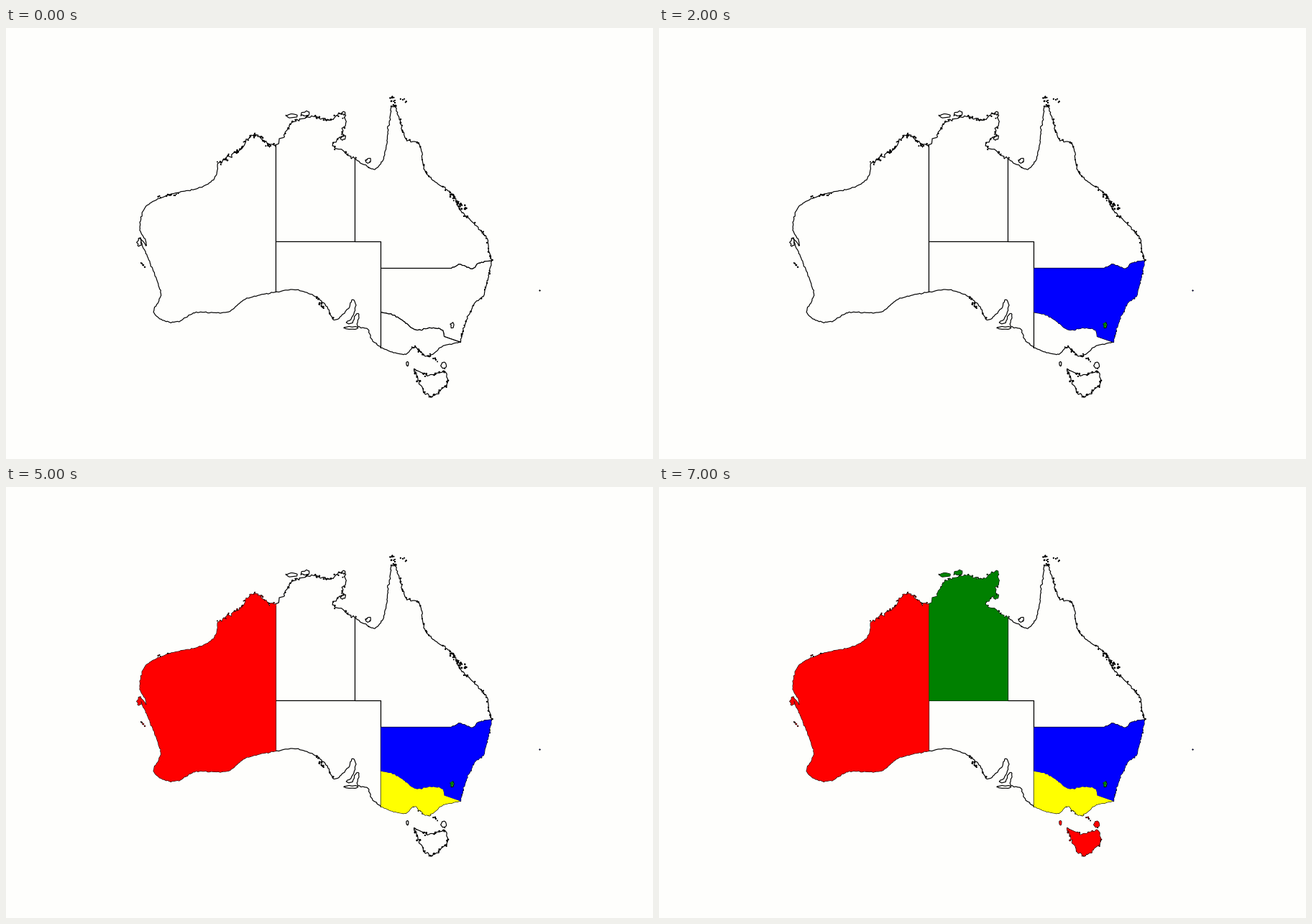
A matplotlib script that plays this animation: 900 by 600 pixels, repeating every 8000 ms.

```python
import numpy as np
import matplotlib.pyplot as plt
from matplotlib.animation import FuncAnimation
from matplotlib.collections import PolyCollection

W, H, DPI = 900, 600, 100
PAPER, INK = "#fefefc", "#000000"
BLUE, GREEN, RED, YELLOW = "#0000ff", "#008000", "#ff0000", "#ffff00"
rng = np.random.default_rng(7)


def coast(keys, amp=0.6, gap=2.2):
    """Smooth curve through key points with a ragged edge; ends stay put."""
    p = np.array(keys, float)
    tangent = np.gradient(p, axis=0)
    tangent /= np.hypot(*tangent.T)[:, None]
    parts = []
    for a, b, u, v in zip(p, p[1:], tangent, tangent[1:]):
        size = np.hypot(*(b - a))
        t = np.linspace(0, 1, max(2, int(size / gap)), endpoint=False)[:, None]
        s = t * t * (3 - 2 * t)
        bend = t * (1 - t) ** 2 * u - t * t * (1 - t) * v
        parts.append(a + (b - a) * s + 0.8 * size * bend)
    line = np.vstack(parts + [p[-1:]])
    line[1:-1] += np.clip(rng.normal(0, amp, (len(line) - 2, 2)), -2 * amp, 2 * amp)
    return line


def blob(x, y, rx, ry, amp=0.4):
    """Small island: a ragged ellipse."""
    a = np.linspace(0, 2 * np.pi, 14, endpoint=False)
    return np.c_[x + rx * np.cos(a), y + ry * np.sin(a)] + rng.normal(0, amp, (14, 2))


def specks(line, n, spread):
    """Tiny islands scattered along a line."""
    line = np.asarray(line, float)
    i = rng.integers(0, len(line) - 1, n)
    t = rng.random((n, 1))
    spots = line[i] * (1 - t) + line[i + 1] * t + rng.normal(0, spread, (n, 2))
    return [blob(x, y, r, r, 0.1) for (x, y), r in zip(spots, rng.uniform(0.2, 0.8, n))]


# Coasts and winding borders
kimberley = coast([(375, 162), (366, 163), (350, 149), (336, 153), (327, 166),
                   (318, 174), (306, 181), (294, 188)], 1.9)
west = coast([(294, 188), (291, 207), (272, 221), (226, 232), (193, 249),
              (186, 279), (195, 302), (186, 292), (203, 334), (215, 371),
              (205, 395), (222, 408), (240, 408), (262, 396), (308, 395),
              (333, 377), (375, 367)], 0.45)
south = coast([(375, 367), (402, 364), (431, 374), (446, 388), (457, 406),
               (476, 389), (482, 377), (486, 386), (479, 406), (473, 409),
               (481, 410), (489, 397), (489, 414), (503, 419), (508, 432),
               (521, 445)], 0.5)
strait = coast([(521, 445), (554, 454), (567, 444), (574, 449), (587, 457),
                (606, 443), (632, 437)], 0.5)
east = coast([(632, 437), (637, 414), (651, 383), (662, 374), (669, 352),
              (675, 324)])
north_east = coast([(485, 182), (511, 196), (522, 187), (529, 160), (533, 127),
                    (538, 108), (545, 122), (556, 154), (574, 161), (584, 202),
                    (621, 232), (632, 254), (643, 264), (669, 293), (671, 308),
                    (675, 324)], 0.7)
top_end = coast([(375, 162), (385, 150), (398, 131), (421, 123), (450, 128),
                 (469, 118), (470, 134), (466, 150), (455, 162), (468, 171),
                 (485, 182)], 1.1)
tasmania = coast([(567, 474), (588, 483), (611, 478), (611, 496), (594, 511),
                  (581, 507), (575, 493), (567, 474)], 0.9)
tweed = coast([(619, 334), (632, 329), (649, 335), (657, 327), (675, 324)])
murray = coast([(521, 395), (541, 400), (557, 412), (570, 420), (588, 418),
                (606, 419), (609, 429)])

regions = {
    "wa": [np.vstack([kimberley, west]), blob(185, 298, 2, 5, 0.8),
           *specks(kimberley, 40, 1.6), *specks([(211, 234), (245, 229)], 12, 1),
           *specks([(188, 327), (193, 332)], 4, 0.6)],
    "nt": [np.vstack([top_end, [(485, 297), (375, 297)]]),
           blob(397, 122, 8, 3, 0.9), blob(416, 119, 6, 3, 0.9),
           blob(469, 152, 3, 3, 0.9), *specks(top_end[10:], 34, 1.3)],
    "sa": [np.vstack([south, [(521, 297), (375, 297)]]),
           blob(479, 417, 10, 2), *specks([(430, 375), (457, 406)], 16, 1.2)],
    "qld": [np.vstack([north_east, tweed[::-1], [(521, 334), (521, 297), (485, 297)]]),
            blob(503, 184, 3.5, 3, 0.7), *specks([(537, 94), (540, 112)], 18, 2),
            *specks([(545, 97), (558, 101)], 5, 1), *specks(north_east[60:], 45, 0.9),
            *specks([(618, 231), (640, 253)], 28, 2.4)],
    "nsw": [np.vstack([[(521, 334)], tweed, east[::-1], murray[::-1]]),
            *specks([(742, 365), (742, 365)], 1, 0), *specks(east, 14, 0.6)],
    "vic": [np.vstack([murray, strait[::-1]]), *specks(strait[20:35], 14, 1)],
    "act": [blob(620, 413, 2, 4)],
    "tas": [tasmania, blob(558, 467, 1.6, 3, 0.2), blob(608, 469, 3, 4.5, 0.8),
            *specks(tasmania, 36, 1.1), *specks([(592, 459), (601, 463)], 4, 0.8)],
}

# One assignment per second; the first second is blank
steps = [("nsw", BLUE), ("act", GREEN), ("vic", BLUE), ("vic", YELLOW),
         ("wa", RED), ("nt", GREEN), ("tas", RED)]

fig = plt.figure(figsize=(W / DPI, H / DPI), dpi=DPI, facecolor=PAPER)
ax = fig.add_axes([0, 0, 1, 1])
ax.set_xlim(-0.5, W - 0.5)
ax.set_ylim(H - 0.5, -0.5)
ax.axis("off")


def layer(rings, **style):
    return ax.add_collection(PolyCollection(rings, **style), autolim=False)


# Colours cover the inner half of the outlines; the enclave lies on top
fills = {}
for name, rings in regions.items():
    z = 3 if name == "act" else 1
    layer(rings, facecolors=PAPER, edgecolors=INK, linewidths=0.85, zorder=z)
    fills[name] = layer(rings, facecolors="none", edgecolors="none", zorder=z + 1)


def draw(i):
    colors = dict(steps[:i])
    for name, fill in fills.items():
        fill.set_facecolor(colors.get(name, "none"))
    return list(fills.values())


anim = FuncAnimation(fig, draw, frames=len(steps) + 1, interval=1000,
                     repeat=True, repeat_delay=0, blit=False)
plt.show()
```
